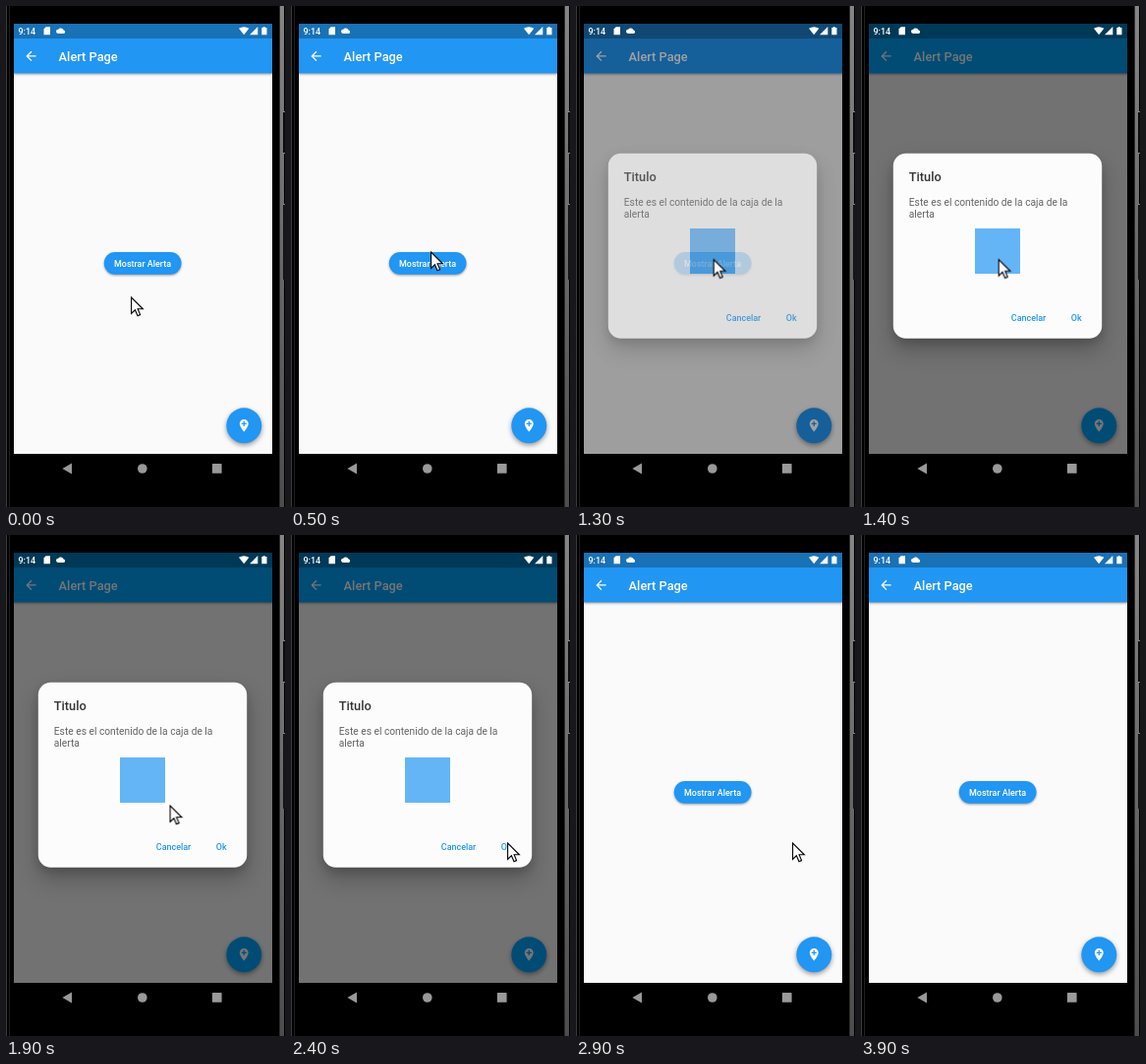
An HTML page for the animation above (4600 ms loop, 284 by 509 pixels).

```html
<!DOCTYPE html>
<html lang="es">
<head>
<meta charset="utf-8">
<title>Alert Page</title>
<style>
  html, body { margin: 0; width: 100%; height: 100%; overflow: hidden; background: #000; }
  svg { display: block; width: 284px; height: 509px; }
  text { font: 500 8.96px Roboto, sans-serif; fill: #fff; }
  .title { font-size: 12.8px; }
  .body { font-weight: 400; font-size: 10.24px; fill: #626262; }
  .blue { fill: #2196f3; }
  .tint { fill: currentColor; }
  .white { fill: #fff; }
  .low { filter: drop-shadow(0 1px 1px rgba(0, 0, 0, .38)); }
  .mid { filter: drop-shadow(0 2px 2.5px rgba(0, 0, 0, .4)); }
  .high { filter: drop-shadow(0 4px 5px rgba(0, 0, 0, .16)) drop-shadow(0 11px 11px rgba(0, 0, 0, .24)); }
  #screen { color: #2196f3; }
  #veil, #dialog, #press { opacity: 0; }
</style>
</head>
<body>
<svg viewBox="0 0 284 509">
  <defs>
    <clipPath id="view"><rect x="8" y="18" width="263" height="437"/></clipPath>
    <linearGradient id="metal" x2="0" y2="1">
      <stop stop-color="#858585"/>
      <stop offset="1" stop-color="#4c4c4c"/>
    </linearGradient>
  </defs>

  <!-- phone body -->
  <rect width="284" height="509"/>
  <rect width="1" height="509" fill="#3a3a3a"/>
  <rect x="3" width="1" height="509" fill="#202020"/>
  <rect x="278" width="1" height="509" fill="#2a2a2a"/>
  <rect x="279" width="4" height="509" fill="url(#metal)"/>
  <rect x="282" y="108" width="2" height="41" fill="#0c0c0c"/>
  <rect x="282" y="201" width="2" height="77" fill="#161616"/>
  <path d="M282 107.5h2M282 149.5h2M282 201.5h2" stroke="#8a8a8a"/>

  <g clip-path="url(#view)">
    <g id="screen">
      <rect x="8" y="18" width="263" height="437" fill="#fafafa"/>
      <rect class="tint low" x="8" y="18" width="263" height="50.4"/>
      <rect x="8" y="18" width="263" height="15" fill-opacity=".25"/>
      <path class="white" transform="translate(17.8 43.3) scale(.64)"
        d="M20 11H7.83l5.59-5.59L12 4l-8 8 8 8 1.41-1.41L7.83 13H20z"/>
      <text class="title" x="53.6" y="55.5">Alert Page</text>

      <rect class="blue low" x="99.8" y="250" width="78.7" height="22.7" rx="11.35"/>
      <text x="110" y="264.7">Mostrar Alerta</text>

      <circle class="tint mid" cx="242.3" cy="426.3" r="18"/>
      <path class="white" transform="translate(234.6 418.6) scale(.64)"
        d="M12 2C8.14 2 5 5.14 5 9c0 5.25 7 13 7 13s7-7.75 7-13c0-3.86-3.14-7-7-7zm4 8h-3v3h-2v-3H8V8h3V5h2v3h3z"/>
    </g>

    <rect id="veil" x="8" y="18" width="263" height="437" fill-opacity=".54"/>

    <g id="dialog">
      <rect class="high" x="32.8" y="149.8" width="212.4" height="188" rx="12.8" fill="#fcfcfc"/>
      <text class="title" x="48.8" y="178" style="fill:#333">Titulo</text>
      <text class="body" x="48.8" y="202.5">Este es el contenido de la caja de la</text>
      <text class="body" x="48.8" y="214.5">alerta</text>
      <rect x="116" y="226" width="46" height="46" fill="#64b5f6"/>
      <rect id="press" x="199" y="306" width="41" height="22" rx="2.5" fill="#2196f3" fill-opacity=".07"/>
      <text class="blue" x="152.8" y="320">Cancelar</text>
      <text class="blue" x="213.8" y="320">Ok</text>
    </g>

    <!-- status bar -->
    <g class="white">
      <text x="12.5" y="28.7">9:14</text>
      <path d="M40.6 21.3H45v8h-6.5v-5.9z"/>
      <path d="M53 28a2.1 2.1 0 0 1 .2-4.2 3 3 0 0 1 5.4.7 1.8 1.8 0 0 1 .2 3.5z"/>
      <path d="M237 22.8q5.2-3.2 10.4 0l-5.2 6.4z"/>
      <path d="M256.3 21v8.2h-8.2z"/>
      <path d="M261.6 21.2h2.2v.9h1.7v7.2h-5.2v-7.2h1.3z"/>
    </g>
  </g>

  <!-- navigation bar -->
  <g fill="#999">
    <path d="M57.4 470l9.6-5.4v10.8z"/>
    <circle cx="138.8" cy="470" r="4.8"/>
    <rect x="209.9" y="465.1" width="9.7" height="9.7" rx=".6"/>
  </g>

  <path id="cursor" d="M.6 1V17.4L4.4 13.8 7 19.7 9.6 18.6 7.1 12.8H12.4z"
    fill="#fff" stroke="#000" stroke-width="1.1"/>
</svg>

<script>
const LOOP = 4600, TICK = 100;

// Keys are [time, style, easing to the next key]; the whole loop is sampled once per tick.
function play(id, ...keys) {
  const frames = keys.map(([t, style, easing = 'linear']) => ({ ...style, offset: t / LOOP, easing }));
  frames.unshift({ ...keys[0][1], offset: 0 });
  frames.push({ ...keys.at(-1)[1], offset: 1 });
  document.getElementById(id).animate(frames, {
    duration: LOOP, iterations: Infinity, easing: `steps(${LOOP / TICK}, end)`
  });
}

const at = (x, y) => ({ transform: `translate(${x}px, ${y}px)` });
const hidden = { opacity: 0 }, shown = { opacity: 1 };

const start = at(127, 295), above = at(142, 249), button = at(139.6, 256.6);
const nearOk = at(220.5, 309), ok = at(220, 312), outside = at(105, -60);
play('cursor',
  [0, start, 'ease-in-out'], [500, above],
  [700, above], [900, button],
  [1700, button, 'ease-in-out'], [2200, nearOk],
  [2300, nearOk], [2400, ok],
  [3300, ok, 'ease-in'], [3900, outside]);

for (const id of ['veil', 'dialog'])
  play(id, [1200, hidden, 'ease-out'], [1400, shown], [2700, shown, 'ease-in'], [2900, hidden]);

play('press', [2700, hidden], [2800, shown], [2900, hidden]);

// The bar and the round button turn a purer blue under the full veil.
const plain = { color: '#2196f3' }, deep = { color: '#00a6ff' };
play('screen', [1300, plain], [1400, deep], [2700, deep], [2800, plain]);
</script>
</body>
</html>
```
